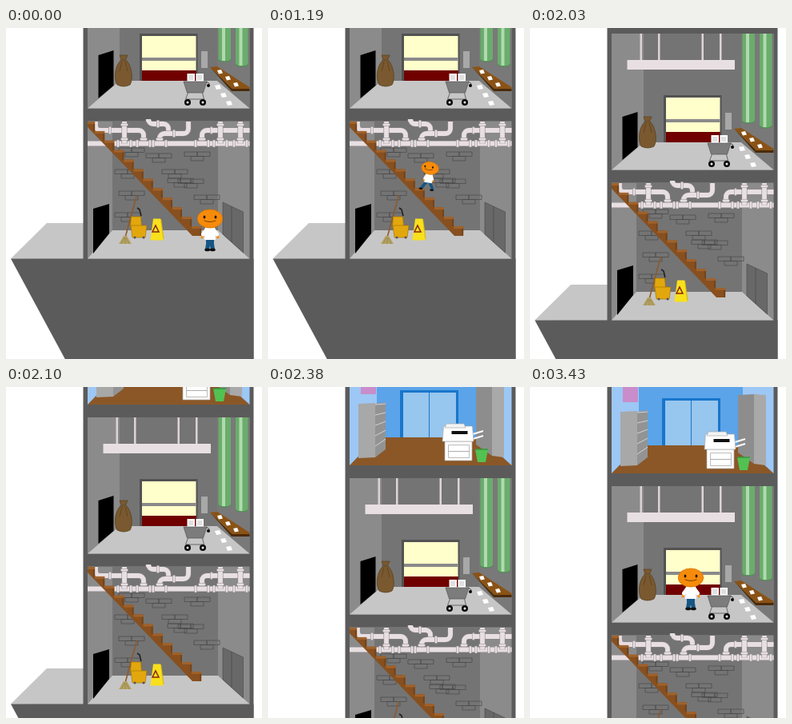
These frames come from a looping animation (320x414 px, 3500 ms). An HTML page with a canvas:

```html
<!DOCTYPE html>
<html lang="en">
<head>
<meta charset="utf-8">
<title>Going up</title>
<style>
html, body { margin: 0; width: 100%; height: 100%; overflow: hidden; background: #fff; }
canvas { display: block; width: 100vw; height: 100vh; }
</style>
</head>
<body>
<canvas id="stage" width="320" height="414"></canvas>
<script>
const ctx = document.getElementById('stage').getContext('2d');
const LOOP = 3500, TICK = 70, RISE = 194;
const LEFT = 102, RIGHT = 304.5;
const DARK = '#5b5b5b', FLOOR = '#c6c6c6', BACK = '#747474', SIDE = '#8b8b8b';
const ORANGE = '#f68b0b', PIPE = '#e8dfe3', RIM = '#8d888a', YELLOW = '#e3a70e';

const mix = (a, b, u) => a + (b - a) * u;
const part = (t, from, to) => Math.min(1, Math.max(0, (t - from) / (to - from)));

function rect(x, y, w, h, fill) {
  ctx.fillStyle = fill;
  ctx.fillRect(x, y, w, h);
}

function trace(p) {
  ctx.beginPath();
  for (let i = 0; i < p.length; i += 2) ctx.lineTo(p[i], p[i + 1]);
}

function stroke(color, width) {
  ctx.strokeStyle = color;
  ctx.lineWidth = width;
  ctx.stroke();
}

function poly(p, fill, edge) {
  trace(p);
  ctx.closePath();
  ctx.fillStyle = fill;
  ctx.fill();
  if (edge) stroke(edge, 0.7);
}

function line(p, color, width = 1) {
  trace(p);
  stroke(color, width);
}

function oval(x, y, rx, ry, fill, edge) {
  ctx.beginPath();
  ctx.ellipse(x, y, rx, ry, 0, 0, Math.PI * 2);
  ctx.fillStyle = fill;
  ctx.fill();
  if (edge) stroke(edge, 0.7);
}

// Symmetric trapezoid: half widths a at the top and b at the bottom.
function taper(x, y, h, a, b, fill, edge) {
  poly([x - a, y, x + a, y, x + b, y + h, x - b, y + h], fill, edge);
}

// Upright quad seen in perspective: far edge inset by `up` and `down`.
function panel(x1, x2, top, bottom, up, down, fill, edge) {
  poly([x1, top, x2, top + up, x2, bottom + down, x1, bottom], fill, edge);
}

function room(top, bottom, left, right, horizon, back, side, floor) {
  rect(LEFT, top, RIGHT - LEFT, bottom - top, side);
  rect(left, top, right - left, horizon - top, back);
  poly([LEFT, bottom, left, horizon, right, horizon, RIGHT, bottom], floor);
}

function shell() {
  poly([51, 244, 98, 244, 98, 290, 6, 288.5], FLOOR);
  rect(96.5, -220, 213, 640, DARK);
  poly([6, 288.5, 309.5, 288.5, 309.5, 420, 77, 420], DARK);
}

function cabinet(x, y) {
  panel(x + 21, x + 34, y, y + 67, -2, -10, '#939393');
  for (let i = 0; i < 5; i++) {
    const drop = i * 13;
    line([x + 21, y + drop + 1, x + 34, y + drop * 0.85], '#d2d2d2');
  }
  panel(x, x + 21, y, y + 68, -1, -1, '#a8a8a8');
}

function copier(x, y) {
  const edge = '#aaa';
  for (let i = 0; i < 2; i++) line([x + 38, y + 12 + i * 6, x + 51, y + 8 + i * 6], '#fff', 2);
  taper(x + 20, y + 21, 24, 17, 17, '#fff', edge);
  taper(x + 19.5, y + 2, 19, 18, 19.5, '#fff', edge);
  taper(x + 16, y - 1, 5, 11, 13, '#f4f4f4', edge);
  rect(x + 11.5, y + 8, 20, 4, '#111');
  for (let i = 0; i < 2; i++) {
    ctx.beginPath();
    ctx.rect(x + 7.5, y + 25.5 + i * 8, 26, 8);
    stroke(edge, 0.8);
  }
}

function office() {
  room(-210, -86, 136, 266, -121, '#5ba4e9', '#9dc7f5', '#8b5727');
  rect(116, -200, 19, 25, '#c88dca');
  rect(165, -180, 73, 59, '#1976cb');
  rect(169, -177, 66, 56, '#97c6ef');
  line([201.5, -177, 201.5, -121], '#1976cb');
  cabinet(113, -163);
  panel(260, 280, -184, -112, -1, 14, '#8d8d8d');
  panel(280, 295, -185, -98, 1, 2, '#a9a9a9');
  copier(218, -137);
  taper(267, -106, 16, 8, 5, '#52c152');
  line([259, -106, 275, -106], '#35993c', 1.5);
}

function greenPipe(x, bottom) {
  const r = 7.75, y = bottom - 3;
  rect(x, -70, r * 2, y + 70, '#6aad6b');
  oval(x + r, y, r, 3, '#6aad6b');
  rect(x + 4.5, -70, 4, y + 72, '#b1d9b0');
  ctx.beginPath();
  ctx.ellipse(x + r, y, r, 3, 0, 0, Math.PI);
  stroke('#4b8e4d', 1);
}

function lamp() {
  for (const x of [137.5, 214.5]) {
    for (const gap of [0, 22.5]) rect(x + gap, -70, 2.5, 34, '#ddd3d7');
  }
  rect(121.5, -37, 134.5, 12, PIPE);
}

function rollerDoor() {
  rect(167, 7, 72.5, 59, '#525252');
  rect(170, 10, 67.5, 43, '#ffffcb');
  rect(170, 37, 67.5, 4, '#8a8a8a');
  rect(170, 53, 67.5, 13, '#700000');
}

function paper(x, y, w) {
  poly([x, y, x + w - 2, y - 1, x + w, y + w / 2, x + 2, y + w / 2 + 1], '#fff');
}

function shelf() {
  poly([255, 49, 283, 76, RIGHT, 76, RIGHT, 79, 282, 79], '#4b2b09');
  poly([255, 49, 264, 48, RIGHT, 74, RIGHT, 76, 283, 76], '#8a5316');
  for (let i = 0; i < 3; i++) {
    paper(264 + i * 10, 53 + i * 8, 7);
    paper(261 + i * 7, 72 + i * 10, 8);
  }
}

function sack(x, y) {
  const fill = '#7a5930', seam = '#58401f';
  ctx.beginPath();
  ctx.moveTo(x - 3, y);
  ctx.bezierCurveTo(x - 12, y + 8, x - 12, y + 25, x - 8, y + 31);
  ctx.quadraticCurveTo(x, y + 35, x + 8, y + 31);
  ctx.bezierCurveTo(x + 12, y + 25, x + 11, y + 8, x + 3, y);
  ctx.fillStyle = fill;
  ctx.fill();
  stroke(seam, 0.8);
  taper(x, y - 6, 6, 5, 2.5, fill, seam);
  for (const side of [-1, 1]) line([x + side * 2, y + 2, x + side * 5, y + 14], seam, 0.8);
}

function cart(x, y) {
  for (const side of [-1, 1]) {
    const cx = x + side * 5.5;
    rect(cx - 4.5, y - 10, 9.5, 11, '#fff');
    for (let i = 0; i < 3; i++) line([cx - 3, y - 7 + i * 2, cx + 3, y - 7 + i * 2], '#999', 0.6);
  }
  taper(x, y, 14, 14.5, 10, '#7c7c7c', '#555');
  line([x + 14, y, x + 18, y + 3], '#444');
  line([x - 9, y + 14, x - 12, y + 22, x + 11, y + 22, x + 9, y + 14], '#666');
  for (const side of [-1, 1]) {
    oval(x + side * 9.5, y + 26, 4, 4, '#080808');
    oval(x + side * 9.5, y + 26, 1.5, 1.5, '#eee');
  }
  oval(x + 16.5, y + 5, 2, 2, '#080808');
}

function depot() {
  room(-70, 100.5, 142, 264, 66, BACK, SIDE, FLOOR);
  poly([264, -70, RIGHT, -70, RIGHT, 100, 264, 66], '#797979');
  panel(115.5, 134.5, 34, 88, -6, -16, '#000');
  lamp();
  rollerDoor();
  rect(244, 29, 8, 21, '#a8a8a8');
  greenPipe(265.5, 42);
  greenPipe(287, 48);
  shelf();
  sack(147, 40);
  cart(236.5, 67);
}

// Two courses in running bond.
function bricks(x, y) {
  ctx.beginPath();
  for (let i = 0; i < 3; i++) {
    const low = i > 1;
    ctx.rect(x + (low ? 8 : i * 16), y + (low ? 5.5 : 0), 16, 5.5);
  }
  stroke('#494949', 0.7);
}

function tube(path) {
  for (const [color, width] of [[RIM, 7], [PIPE, 5.8]]) {
    ctx.beginPath();
    path();
    stroke(color, width);
  }
}

function flange(x, y, w, h) {
  rect(x - w / 2 - 0.4, y - h / 2 - 0.4, w + 0.8, h + 0.8, RIM);
  rect(x - w / 2, y - h / 2, w, h, PIPE);
}

function straight(x1, y1, x2, y2) {
  tube(() => { ctx.moveTo(x1, y1); ctx.lineTo(x2, y2); });
}

function bend(x, y, endX, endY) {
  tube(() => {
    ctx.moveTo(x, y);
    ctx.arcTo(x, endY, endX, endY, 6);
    ctx.lineTo(endX, endY);
  });
  flange(endX, endY, 2.5, 8.5);
}

function pipes() {
  const main = 144.5, top = 117, mid = 128;
  bend(178, top, 190, 120);
  bend(203, 132, 190, 120);
  bend(192, main, 210, 132);
  bend(228, top, 210, 132);
  bend(112, top, 130, mid);
  bend(172, main, 130, mid);
  bend(245, main, 257, mid);
  straight(257, mid, RIGHT, mid);
  straight(LEFT, main, RIGHT, main);
  for (const x of [148, 268, 293]) {
    straight(x, top, x, main);
    flange(x, 121, 8.5, 2.5);
  }
  for (const x of [148, 172, 192, 245, 268, 293]) {
    flange(x, 139, 8.5, 2.5);
    flange(x - 8, main, 2.5, 8.5);
    flange(x + 8, main, 2.5, 8.5);
  }
}

function stairs() {
  const count = 12, w = 12.1, h = 11.9, outline = [];
  const step = i => [Math.max(LEFT, 99 + i * w), 117 + i * h, 99 + (i + 1) * w];
  for (let i = 0; i < count; i++) {
    const [x, y, end] = step(i);
    outline.push(x, y, end, y);
  }
  poly([...outline, 244, 260, 233, 260, LEFT, 124], '#88501f');
  for (let i = 0; i < count; i++) {
    const [x, y, end] = step(i);
    rect(x, y, end - x, 3, '#a0622b');
    rect(end - 2, y + 3, 2, h - 3, '#74431a');
  }
}

function cleaning() {
  line([163.5, 209, 149, 262], '#8c5a30', 1.6);
  taper(149, 260, 10, 2, 8, '#b5a365');
  for (let i = -1; i < 2; i++) line([149 + i, 262, 149 + i * 5, 270], '#8e7d45', 0.7);

  line([164, 225, 167, 227, 169, 235], '#222', 1.6);
  taper(162.5, 236, 12, 6, 7, YELLOW, '#a67600');
  taper(166, 247, 15, 10, 8, YELLOW, '#a67600');
  for (const x of [161, 172]) oval(x, 262, 1.5, 1.5, '#555');

  taper(191, 239, 25, 3, 6.5, '#d8b90b');
  taper(188.5, 238.5, 27, 4.5, 8, '#f8e01c');
  taper(187, 247, 8, 0, 4, '#f8e01c');
  stroke('#8a2410', 1.5);
}

function basement() {
  room(116.5, 288.5, 133, 265, 253, BACK, SIDE, FLOOR);
  panel(109, 129, 226, 282, -6, -25, '#000');
  panel(271, 296.5, 218, 258, 12, 23, '#686868', '#505050');
  line([282, 223, 282, 268], '#505050');
  for (let i = 0; i < 4; i++) {
    bricks(141 - i % 2 * 5, 150 + i * 27);
    bricks(175 + i * 20, 157 + i * 20 - (i > 1 ? 8 : 0));
  }
  bricks(223, 155);
  bricks(202, 188);
  pipes();
  stairs();
  cleaning();
}

// Feet stand at x, y; dir is -1, 0 or 1; stride swings the limbs.
function walker(x, y, scale, dir, stride, lean) {
  ctx.save();
  ctx.translate(x, y);
  ctx.rotate(lean);
  ctx.scale(scale, scale);
  ctx.lineCap = 'round';
  for (const side of [-1, 1]) {
    const foot = side * (dir ? stride * 10 : 3.3);
    const hand = side * (dir ? stride * 8 : 10);
    line([side * 2.5, -15, foot * 0.7, -9, foot, -3], '#155684', 5.2);
    oval(foot + dir * 1.5, -1.6, 3.5, 1.8, '#101010');
    line([side * 6, -26, hand, -17], ORANGE, 3);
    line([side * 4, -27, mix(side * 4, hand, 0.75), -21], '#fff', 5);
  }
  taper(0, -31, 17, 6, 7, '#fff');
  oval(0, -40.5, 15.8, 11.6, ORANGE, '#cf6f00');
  const face = dir * 2.5;
  for (const side of [-1, 1]) oval(face + side * 7, -42.5, 1.4, 2, '#201000');
  ctx.beginPath();
  ctx.moveTo(face - 7, -38);
  ctx.quadraticCurveTo(face, -35, face + 7, -38);
  stroke('#5c2a00', 0.8);
  ctx.restore();
}

function person(t) {
  const stride = Math.cos((t - 2870) / TICK * Math.PI / 3);
  if (t < 420) {
    walker(255, 279, 1, 0, 0, 0);
  } else if (t <= 910) {
    const u = part(t, 350, 910);
    walker(mix(255, 245, u), mix(279, 256, u), mix(1, 0.69, u), -1, stride, u * 0.15);
  } else if (t < 1540) {
    const u = part(t, 910, 1470) ** 1.38;
    walker(mix(245, 124, u), mix(256, 118, u), 0.69, -1, stride, 0.15);
  } else if (t >= 2870) {
    const u = part(t, 2870, 3290);
    walker(mix(132, 201, u), 85, 1, u < 1 ? 1 : 0, stride, 0);
  }
}

const start = performance.now();

function draw(now) {
  const elapsed = Math.max(0, now - start) % LOOP;
  const t = Math.floor(elapsed / TICK) * TICK;
  const left = 1 - part(t, 1890, 2520);
  ctx.setTransform(1, 0, 0, 1, 0, 0);
  rect(0, 0, 320, 414, '#fff');
  ctx.translate(0, Math.round(RISE * (1 - left * left)));
  shell();
  office();
  depot();
  basement();
  person(t);
  requestAnimationFrame(draw);
}

requestAnimationFrame(draw);
</script>
</body>
</html>
```
